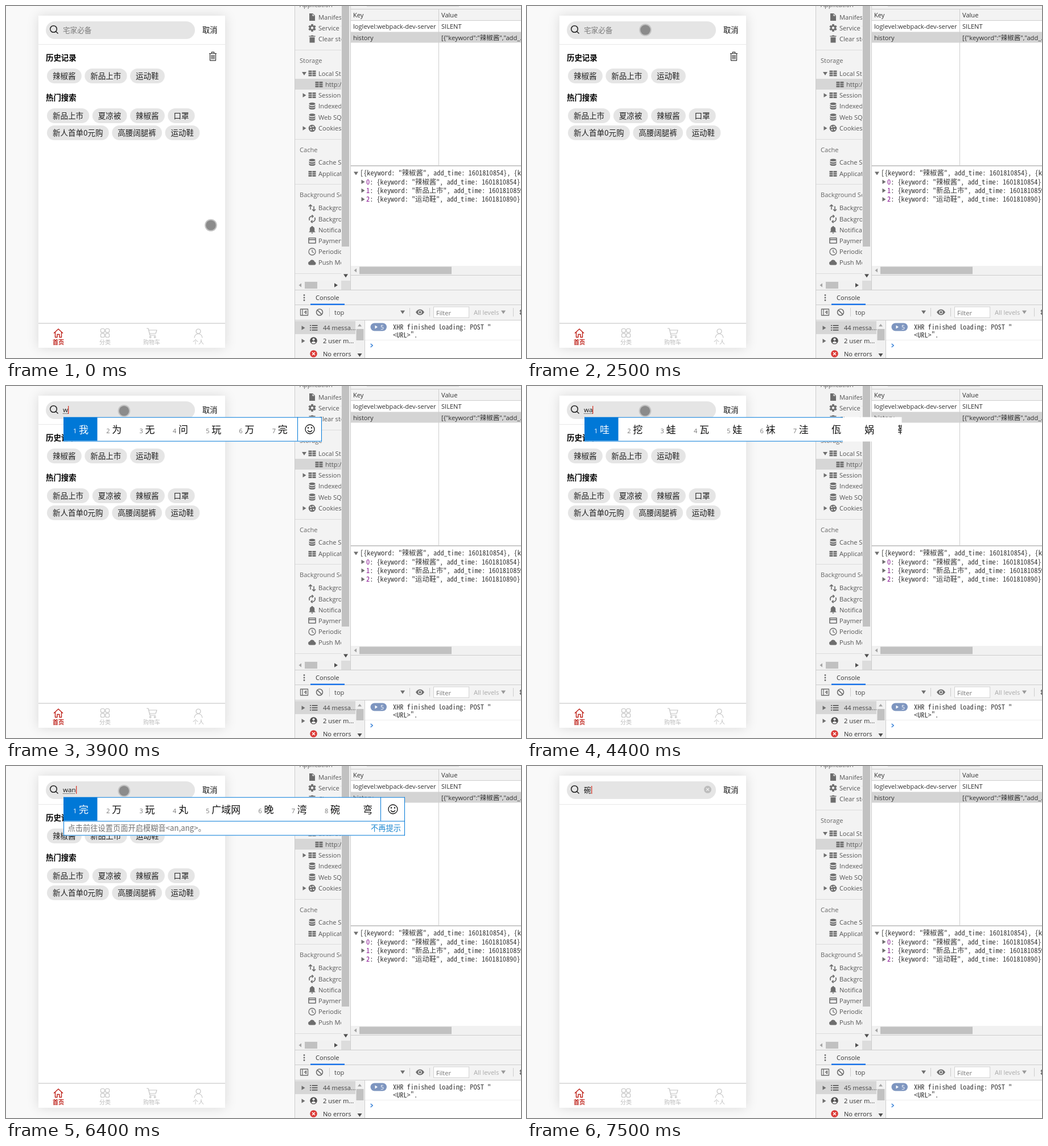
Recreate the animation shown at these times as an HTML page with a canvas. Size 905 by 619 pixels, loop 8 s.

```html
<!DOCTYPE html>
<html lang="zh-CN">
<head>
<meta charset="utf-8">
<title>Search history</title>
<style>
html, body { margin: 0; width: 100%; height: 100%; overflow: hidden; background: #f9f9f9; }
canvas { display: block; }
</style>
</head>
<body>
<canvas id="stage"></canvas>
<script>
const W = 905, H = 619, LOOP = 8000;
const UI = '"Open Sans", "Noto Sans CJK SC", sans-serif';
const CJK = '"Noto Sans CJK SC", sans-serif';
const MONO = '"Noto Sans Mono CJK SC", "Noto Sans CJK SC", monospace';
const GREY = '#6e6e6e', INK = '#303030', LINE = '#cdcdcd', PANEL = '#f3f3f3', RED = '#be2119', BLUE = '#0078d7';

const canvas = document.getElementById('stage');
const ctx = canvas.getContext('2d');
const dpr = window.devicePixelRatio || 1;
canvas.width = W * dpr;
canvas.height = H * dpr;
canvas.style.width = W + 'px';
canvas.style.height = H + 'px';

// ---- helpers ----
function box(x, y, w, h, color) {
  ctx.fillStyle = color;
  ctx.fillRect(x, y, w, h);
}
function pill(x, y, w, h, r, color) {
  ctx.fillStyle = color;
  ctx.beginPath();
  ctx.roundRect(x, y, w, h, r);
  ctx.fill();
}
function disc(x, y, r, color) {
  ctx.fillStyle = color;
  ctx.beginPath();
  ctx.arc(x, y, r, 0, 7);
  ctx.fill();
}
// y is the vertical middle of the capitals; returns the end x
function text(s, x, y, size, color, family = UI, weight = 400) {
  ctx.font = `${weight} ${size}px ${family}`;
  ctx.fillStyle = color;
  ctx.fillText(s, x, y + size * 0.365);
  return x + ctx.measureText(s).width;
}
const ui = (s, x, y, color = INK) => text(s, x, y, 11.1, color);
const mono = (s, x, y, color = '#383838') => text(s, x, y, 12.3, color, MONO);
function centered(s, x, y, size, color, family, weight) {
  ctx.textAlign = 'center';
  text(s, x, y, size, color, family, weight);
  ctx.textAlign = 'left';
}
function clip(x, y, w, h, draw) {
  ctx.save();
  ctx.beginPath();
  ctx.rect(x, y, w, h);
  ctx.clip();
  draw();
  ctx.restore();
}
// path is centred on 0,0
function stroke(path, x, y, color, width = 1.2) {
  ctx.save();
  ctx.translate(x, y);
  ctx.strokeStyle = color;
  ctx.lineWidth = width;
  ctx.lineJoin = 'round';
  ctx.stroke(new Path2D(path));
  ctx.restore();
}
function fill(path, x, y, color) {
  ctx.save();
  ctx.translate(x, y);
  ctx.fillStyle = color;
  ctx.fill(new Path2D(path), 'evenodd');
  ctx.restore();
}
const TRI = {
  right: 'M-2.5-3.8L3.5 0L-2.5 3.8Z', left: 'M2-3.5L-2.5 0L2 3.5Z',
  down: 'M-4-2.5H4L0 3.5Z', up: 'M-3.5 2L0-2.5L3.5 2Z'
};
const last = (list, t) => list.filter(k => k[0] <= t).pop();

// ---- sidebar icons ----
const icons = {
  file(x, y) { fill('M-5-6.5H1L5-2.5V6.5H-5ZM.5-5.5V-2H4Z', x, y, GREY); },
  gear(x, y) {
    for (let i = 0; i < 3; i++) {
      ctx.save();
      ctx.translate(x, y);
      ctx.rotate(i * Math.PI / 3);
      box(-1.8, -6.6, 3.6, 13.2, GREY);
      ctx.restore();
    }
    disc(x, y, 4.8, GREY);
    disc(x, y, 2.2, PANEL);
  },
  bin(x, y) { fill('M-5.5-5.5H-2.5L-1.5-6.5H1.5L2.5-5.5H5.5V-4H-5.5ZM-4.5-3H4.5V6.5H-4.5Z', x, y, GREY); },
  grid(x, y) {
    for (let r = 0; r < 3; r++) for (let c = 0; c < 2; c++) box(x - 6.5 + c * 7, y - 5 + r * 3.6, 6, 2.8, GREY);
  },
  data(x, y) {
    fill('M-5.5-4C-5.5-7 5.5-7 5.5-4S-5.5-1-5.5-4Z', x, y, GREY);
    for (const d of [0, 3.6]) fill('M-5.5-2C-4 .5 4 .5 5.5-2V.3C4 3.2-4 3.2-5.5.3Z', x, y + d, GREY);
  },
  cookie(x, y) {
    disc(x, y, 6.3, GREY);
    for (const [a, b] of [[-2.5, -2], [1.5, -3], [-2, 2.5], [2.5, 2], [5.5, -4]]) disc(x + a, y + b, 1.3, PANEL);
  },
  swap(x, y) { stroke('M-3 3V-5M-6-2.5L-3-5.5L0-2.5M3-3V5M0 2.5L3 5.5L6 2.5', x, y, GREY, 1.6); },
  sync(x, y) { stroke('M-4.5 2.5A5 5 0 0 1 1.5-4.7M4.5-2.5A5 5 0 0 1-1.5 4.7M-.5-7L2-4.7L-.5-2.4M.5 7L-2 4.7L.5 2.4', x, y, GREY, 1.6); },
  bell(x, y) { fill('M-6 4.2L-4.2 2.5V-1.5Q-4-5-1-5.5V-6.5H1V-5.5Q4-5 4.2-1.5V2.5L6 4.2ZM-1.6 5H1.6Q1.2 6.8 0 6.8T-1.6 5Z', x, y, GREY); },
  card(x, y) { stroke('M-6-4.5H6V4.5H-6ZM-6-1.6H6', x, y, GREY, 1.6); },
  clock(x, y) { stroke('M6 0A6 6 0 1 1-6 0A6 6 0 1 1 6 0M0-3.5V.3L2.8 2', x, y, GREY, 1.3); },
  cloud(x, y) { fill('M-4 4.5A3.3 3.3 0 0 1-4.3-2A4.6 4.6 0 0 1 4.3-1.2A2.9 2.9 0 0 1 4 4.5Z', x, y, GREY); }
};

// ---- phone ----
function chips(words, y) {
  let x = 72;
  for (const w of words) {
    ctx.font = `13.5px ${CJK}`;
    const width = ctx.measureText(w).width + 20.3;
    pill(x, y, width, 26, 13, '#e5e5e5');
    text(w, x + 10, y + 13.3, 13.5, '#222', CJK);
    x += width + 5.5;
  }
}

function history() {
  text('历史记录', 70, 91, 13.4, '#000', CJK, 700);
  stroke('M-6.5-5H6.5M-2.2-5V-7.3H2.2V-5M-5-5V7.3H5V-5M-2.3-2.5V5M0-2.5V5M2.3-2.5V5', 363.5, 88.5, '#333', 1.2);
  chips(['辣椒酱', '新品上市', '运动鞋'], 110);
  text('热门搜索', 70, 161, 13.4, '#000', CJK, 700);
  chips(['新品上市', '夏凉被', '辣椒酱', '口罩'], 180);
  chips(['新人首单0元购', '高腰阔腿裤', '运动鞋'], 210);
}

function tabs() {
  const pale = '#c4c4c4';
  box(57, 557, 328, 2, '#dedede');
  stroke('M-8 0L0-7.5L8 0M-5.5-2V7H-2V2H2V7H5.5V-2', 92, 575.5, RED, 1.4);
  for (const dx of [-4.2, 4.2]) for (const dy of [-4.2, 4.2]) {
    ctx.strokeStyle = pale;
    ctx.lineWidth = 1.2;
    ctx.beginPath();
    ctx.roundRect(174 + dx - 3.3, 575 + dy - 3.3, 6.6, 6.6, 2);
    ctx.stroke();
  }
  stroke('M-9-8H-6L-3 4H7M-5.2-5H9L7 1H-3.8M-1 7.2A1.3 1.3 0 1 1-1 7.1M7 7.2A1.3 1.3 0 1 1 7 7.1', 256, 575, pale, 1.2);
  stroke('M4-3.5A4 4 0 1 1-4-3.5A4 4 0 1 1 4-3.5M-7 8Q-6 1 0 1T7 8', 338, 575.5, pale, 1.2);
  ['首页', '分类', '购物车', '个人'].forEach((s, i) =>
    centered(s, 92 + i * 82, 591.3, 10, i ? '#bdbdbd' : RED, CJK, i ? 400 : 700));
}

function phone(t) {
  ctx.save();
  ctx.shadowColor = 'rgba(0,0,0,.13)';
  ctx.shadowBlur = 20 * dpr;
  box(57, 17, 328, 584, '#fff');
  ctx.restore();
  box(57, 67, 328, 1, '#e8e8e8');
  pill(70, 27, 262, 31, 15.5, '#e5e5e5');
  stroke('M5.8 0A5.8 5.8 0 1 1-5.8 0A5.8 5.8 0 1 1 5.8 0M4.2 4.2L8 8', 83.5, 40.5, '#222', 1.5);
  text('取消', 345, 42, 13.3, '#111', CJK);

  const composing = t >= 3900 && t < 6500;
  const typed = last([[0, ''], [3900, 'w'], [4300, 'wa'], [4500, 'wan'], [6500, '碗']], t)[1];
  let end = 100.3;
  if (typed) end = text(typed, 100, 42, composing ? 11.6 : 12.6, '#111');
  else text('宅家必备', 100, 42.2, 12.6, '#7a7a7a', CJK);
  if (composing) for (let x = 100; x < end - 1; x += 2) box(x, 48, 1, 1, '#222');
  const off = [[0, 3400], [5000, 5500], [5900, 6400], [7000, 7400]].some(([a, b]) => t >= a && t < b);
  if (!off) box(Math.round(end), 35, 1.3, 14, '#d63a2c');

  if (t < 6500) history();
  else {
    disc(317.5, 41.3, 6.5, '#bdbdbd');
    stroke('M-2.4-2.4L2.4 2.4M2.4-2.4L-2.4 2.4', 317.5, 41.3, '#f2f2f2', 1.2);
  }
  tabs();
}

// ---- developer tools ----
function sidebar() {
  box(507, 0, 398, H, PANEL);
  box(507, 0, 1, H, LINE);
  box(508, 128, 82, 19, '#d6d6d6');
  clip(508, 0, 81, 482, () => {
    const rows = [
      ['file', 'Manifest', 19.5], ['gear', 'Service Workers', 38.5], ['bin', 'Clear storage', 58],
      ['grid', 'Local Storage', 118.5, 'down'], ['grid', 'Session Storage', 157, 'right'],
      ['data', 'IndexedDB', 176], ['data', 'Web SQL', 195.5], ['cookie', 'Cookies', 215, 'right'],
      ['data', 'Cache Storage', 275], ['grid', 'Application Cache', 295],
      ['swap', 'Background Fetch', 355], ['sync', 'Background Sync', 374.5], ['bell', 'Notifications', 393.5],
      ['card', 'Payment Handler', 412.5], ['clock', 'Periodic Background Sync', 432], ['cloud', 'Push Messaging', 451]
    ];
    for (const [icon, label, y, tri] of rows) {
      icons[icon](538, y);
      ui(label, 549, y, '#555');
      if (tri) fill(TRI[tri], 524, y, GREY);
    }
    icons.grid(550, 138);
    ui('http://localhost', 561, 138, '#555');
    for (const [s, y] of [['Application', -2.5], ['Storage', 96], ['Cache', 252.5], ['Background Services', 332]]) ui(s, 516, y, '#666');
    for (const y of [77, 234, 313, 470]) box(508, y, 82, 1, '#dcdcdc');
  });
  box(589, 0, 16, 483, '#f1f1f1');
  box(590, 0, 13, 423, '#c1c1c1');
  fill(TRI.down, 597, 474, '#505050');
  box(508, 483, 81, 16, '#f1f1f1');
  box(525, 485, 22, 12, '#c1c1c1');
  fill(TRI.left, 517, 491, '#a3a3a3');
  fill(TRI.right, 579.5, 491, '#505050');
  box(589, 483, 16, 16, '#dcdcdc');
}

function storage() {
  box(605, 0, 1, 499, LINE);
  box(606, 26, 299, 431, '#fff');
  box(634, 0, 162, 1.5, '#dedede');
  box(606, 5, 299, 1, LINE);
  box(606, 25, 299, 1, LINE);
  box(606, 45.5, 299, 19, '#d4d4d4');
  box(760, 6, 1, 275, LINE);
  box(606, 280, 299, 2, '#c9c9c9');
  ui('Key', 610, 16);
  ui('Value', 765, 16);
  ui('loglevel:webpack-dev-server', 610, 36);
  ui('SILENT', 765, 36);
  ui('history', 610, 55.5);
  let x = ui('[{"keyword":"', 765, 55.5);
  x = text('辣椒酱', x, 55.5, 11.5, INK, CJK);
  ui('","add_...', x, 55.5);

  const words = [['辣椒酱', 1601810854], ['新品上市', 1601810859], ['运动鞋', 1601810890]];
  const entry = ([w, time]) => `{keyword: "${w}", add_time: ${time}}`;
  fill(TRI.down, 615, 294, GREY);
  mono(`[${entry(words[0])}, {keyword`, 622, 293.7);
  words.forEach((w, i) => {
    const y = 309.3 + i * 15.3;
    fill(TRI.right, 627, y, GREY);
    mono(': ' + entry(w), mono(i, 633, y, '#881391'), y);
  });

  box(606, 457, 299, 16, '#f1f1f1');
  box(621, 458.5, 162, 13, '#c1c1c1');
  fill(TRI.left, 614, 465, '#a3a3a3');
  box(606, 473, 299, 1, LINE);
}

function consolePanel(t) {
  box(508, 499, 397, 1, LINE);
  for (const d of [-4.5, 0, 4.5]) disc(524, 513 + d, 1.4, GREY);
  ui('Console', 544, 513, '#333');
  box(508, 525, 397, 1, LINE);
  box(535, 523.5, 60, 2.5, '#1a73e8');
  box(508, 552, 397, 1, LINE);

  stroke('M-6.5-5.5H6.5V5.5H-6.5ZM-3-5.5V5.5M3.5-2.5L.5 0L3.5 2.5Z', 524, 538.5, GREY, 1.3);
  stroke('M5.5 0A5.5 5.5 0 1 1-5.5 0A5.5 5.5 0 1 1 5.5 0M-3.9-3.9L3.9 3.9', 551, 538.5, GREY, 1.6);
  for (const x of [568, 709, 744, 891]) box(x, 531, 1, 15, LINE);
  ui('top', 577, 539, '#444');
  fill(TRI.down, 697, 538, GREY);
  fill('M-7.5 0Q-4.5-5 0-5T7.5 0Q4.5 5 0 5T-7.5 0ZM3.2 0A3.2 3.2 0 1 0-3.2 0A3.2 3.2 0 1 0 3.2 0Z', 727.5, 538.5, GREY);
  disc(727.5, 538.5, 2, GREY);
  box(751, 528.5, 63, 20, '#d2d2d2');
  box(752, 529.5, 61, 18, '#fff');
  ui('Filter', 756, 539.5, '#757575');
  ui('All levels', 822, 539, '#aaa');
  fill(TRI.down, 874, 538, '#999');
  icons.gear(909, 538.5);

  box(508, 554, 106, 23, '#d6d6d6');
  fill(TRI.right, 522, 566, GREY);
  for (const d of [-4, 0, 4]) {
    box(534, 565 + d, 2, 1.7, '#555');
    box(537.5, 565 + d, 10, 1.7, '#555');
  }
  ui((t < 6600 ? 44 : 45) + ' messa...', 557, 566, '#444');
  fill(TRI.right, 522, 589, GREY);
  disc(540.5, 588.5, 6.3, '#505050');
  disc(540.5, 586.3, 2.1, PANEL);
  fill('M-4 3.5Q0-1 4 3.5Q0 6.5-4 3.5Z', 540.5, 588.5, PANEL);
  ui('2 user m...', 557, 589);
  disc(540.5, 611.5, 6.3, '#db3a36');
  stroke('M-2.5-2.5L2.5 2.5M2.5-2.5L-2.5 2.5', 540.5, 611.5, '#fff', 1.5);
  ui('No errors', 557, 612);

  box(614, 553, 16, 66, '#f1f1f1');
  box(615.5, 568, 13, 20, '#c1c1c1');
  fill(TRI.up, 621.5, 561.5, '#a3a3a3');
  fill(TRI.down, 621.5, 613.5, '#505050');
  box(630, 553, 1, 66, LINE);
  box(631, 553, 274, 66, '#fff');
  pill(640.5, 557.5, 28.5, 14, 7, '#7d95bf');
  fill('M-2-3L2.5 0L-2 3Z', 650.5, 564.5, '#fff');
  text('5', 658, 564.8, 10.5, '#fff');
  mono('XHR finished loading: POST "', 680, 565);
  mono('<URL>".', 680, 578.5);
  box(631, 587, 274, 1, '#eee');
  stroke('M-1.8-3L1.8 0L-1.8 3', 642.5, 597, '#2f7cd6', 1.5);
}

// ---- input method window ----
// while it widens, the frame still has its old width
const WA = ['哇', '挖', '蛙', '瓦', '娃', '袜', '洼', '佤', '娲', '鞋'];
const bars = [
  [3900, { words: ['我', '为', '无', '问', '玩', '万', '完'], numbered: 7, right: 512 }],
  [4300, { words: WA.slice(0, 7), numbered: 7, right: 512 }],
  [4400, { words: WA, numbered: 7, right: 658.5, growing: true }],
  [4500, { words: ['完', '万', '玩', '丸', '广域网', '晚', '湾', '碗', '弯'], numbered: 8, right: 658, hint: true }]
];

function candidates(t) {
  if (t < 3900 || t >= 6500) return;
  const { words, numbered, right, growing, hint } = last(bars, t)[1];
  const top = 54.7, base = 96.6;
  const end = growing ? right : right + 43;
  const bottom = hint ? 122.4 : base + 1;
  box(101, top, end - 101, bottom - top, '#fff');
  clip(101, top, right - 101, base - top, () => {
    let x = 101;
    words.forEach((w, i) => {
      const active = i === 0;
      if (active) box(x, top, 59.5, base - top, BLUE);
      if (i < numbered) text(i + 1, x + 17, 78.5, 11, active ? '#fff' : '#777');
      text(w, x + (i < numbered ? 27 : 25.8), 77, 17, active ? '#fff' : '#111', CJK);
      x += 58.3 + (w.length - 1) * 17;
    });
  });
  const edge = growing ? 555 : end;
  box(101, top, edge - 101, 1, BLUE);
  box(101, base, edge - 101, 1, BLUE);
  box(101, top, 1, bottom - top, BLUE);
  if (!growing) {
    box(right, top, 1, base - top, BLUE);
    box(end - 1, top, 1, bottom - top, BLUE);
    stroke('M8 0A8 8 0 1 1-8 0A8 8 0 1 1 8 0M-4 2Q0 7 4 2', right + 22, 76, '#111', 1.3);
    disc(right + 19, 73.5, 1.2, '#111');
    disc(right + 25, 73.5, 1.2, '#111');
  }
  if (hint) {
    text('点击前往设置页面开启模糊音<an,ang>。', 108.5, 109.5, 13.25, '#707070', CJK);
    text('不再提示', 641, 109.5, 13.25, '#1a86d0', CJK);
    box(101, bottom - 1, end - 101, 1, BLUE);
  }
}

// ---- pointer ----
const pointer = [
  [0, 360, 385.5], [400, 286, 298], [500, 212, 210], [700, 201.5, 92.5], [800],
  [2500, 208, 42], [3700], [3900, 207.5, 43.7], [7500]
];

function touch(t) {
  const [, x, y] = last(pointer, t);
  if (x === undefined) return;
  disc(x, y, 10.8, '#c3c3c3');
  disc(x, y, 8.8, '#8b8b8b');
}

function frame(now) {
  const t = now % LOOP;
  ctx.setTransform(dpr, 0, 0, dpr, 0, 0);
  box(0, 0, W, H, '#f9f9f9');
  phone(t);
  sidebar();
  storage();
  consolePanel(t);
  candidates(t);
  touch(t);
}

const start = performance.now();
(function loop() {
  frame(performance.now() - start);
  requestAnimationFrame(loop);
})();
</script>
</body>
</html>
```
